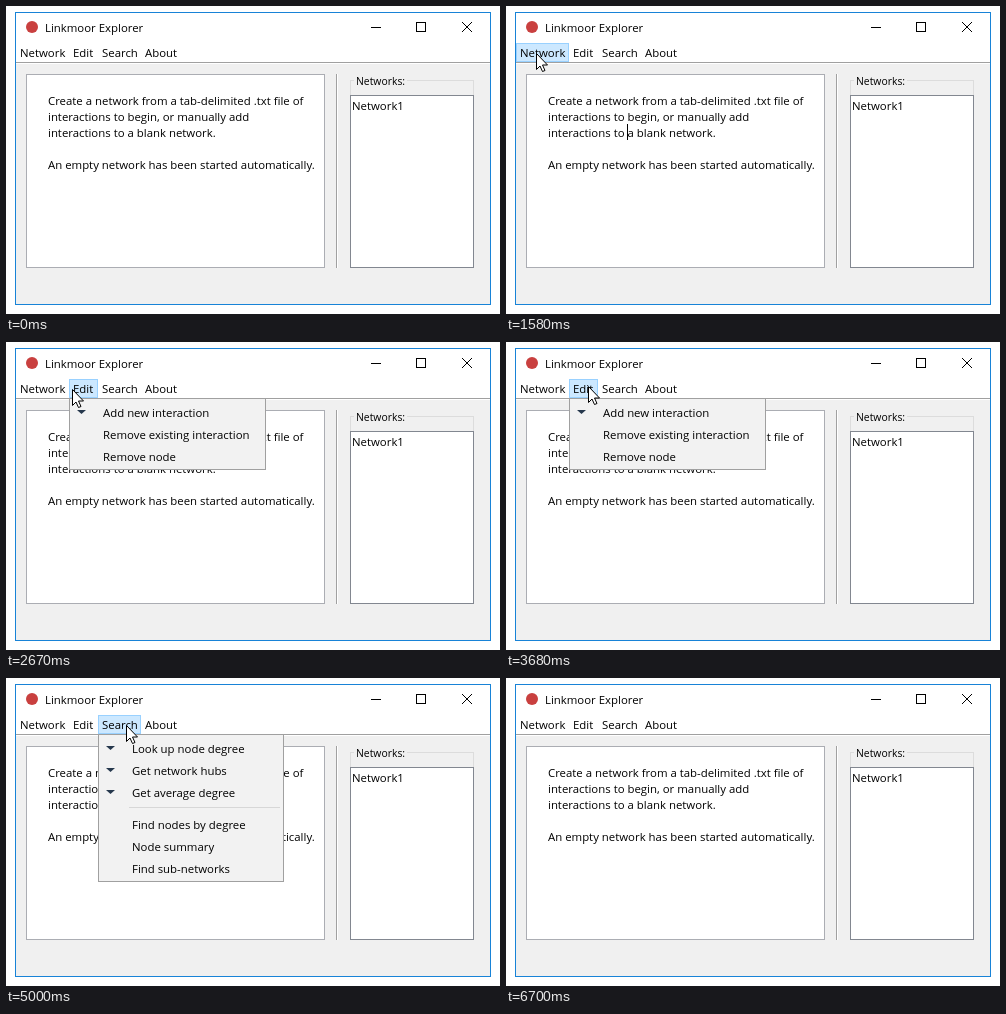
Recreate the animation shown at these times as an HTML page. Size 494 px wide and 308 px high, loop 7620 ms.

```html
<!DOCTYPE html>
<html lang="en">
<head>
<meta charset="utf-8">
<title>Menu tour</title>
<style>
  html, body { margin: 0; width: 100%; height: 100%; overflow: hidden; background: #fff; }
  svg { display: block; width: 494px; height: 308px; }
  text { font: 11.4px "Open Sans", "Noto Sans", sans-serif; fill: #000; white-space: pre; }
  rect, .line { shape-rendering: crispEdges; }
</style>
</head>
<body>
<svg id="stage" viewBox="0 0 494 308"></svg>
<script>
const LOOP = 7620, STEP = 75;
const stage = document.getElementById("stage");

function add(parent, tag, attrs, content) {
  const node = document.createElementNS("http://www.w3.org/2000/svg", tag);
  for (const key in attrs) node.setAttribute(key, attrs[key]);
  if (content) node.textContent = content;
  return parent.appendChild(node);
}
const fill = (p, x, y, width, height, color) =>
  add(p, "rect", { x, y, width, height, fill: color });
const box = (p, x, y, w, h, color, stroke) =>
  add(p, "rect", { x: x + .5, y: y + .5, width: w - 1, height: h - 1, fill: color, stroke });
const label = (p, x, y, str) => add(p, "text", { x, y }, str);
const show = (node, on) => node.setAttribute("visibility", on ? "visible" : "hidden");

// Items marked with "*" carry an arrow; "-" is a separator.
const menus = [
  { name: "Network", tab: 53, width: 199, items: [
    "*Create new network from file", "*Create new blank network", "-",
    "*Export degree distribution", "Export network as file", "Display network interactions", "-",
    "Rename current network", "Duplicate current network", "Delete current network"] },
  { name: "Edit", tab: 29, width: 197, items: [
    "*Add new interaction", "Remove existing interaction", "Remove node"] },
  { name: "Search", tab: 43, width: 186, items: [
    "*Look up node degree", "*Get network hubs", "*Get average degree", "-",
    "Find nodes by degree", "Node summary", "Find sub-networks"] },
  { name: "About", tab: 41, width: 75, items: ["Help"] }
];

function drawWindow() {
  box(stage, 9, 6, 476, 293, "#f0f0f0", "#1883d7");
  fill(stage, 10, 7, 474, 51, "#fff");
  fill(stage, 10, 56, 474, 1, "#a0a0a0");
  add(stage, "circle", { cx: 26, cy: 21, r: 6, fill: "#c9403f" });
  label(stage, 39, 26, "Linkmoor Explorer");

  fill(stage, 365, 21, 10, 1, "#000");
  box(stage, 410, 16, 10, 10, "none", "#000");
  add(stage, "path", { d: "M456 16l10 10m0-10l-10 10", stroke: "#000", fill: "none" });

  box(stage, 20, 68, 299, 194, "#fff", "#abadb3");
  ["Create a network from a tab-delimited .txt file of",
   "interactions to begin, or manually add",
   "interactions to a blank network.", "",
   "An empty network has been started automatically."
  ].forEach((str, i) => label(stage, 42, 99 + 16 * i, str));

  fill(stage, 330, 68, 1, 194, "#a0a0a0");
  fill(stage, 331, 68, 1, 194, "#fff");
  add(stage, "path", { class: "line", d: "M344.5 89V74.5H348M401 74.5H467.5V89",
    stroke: "#dcdcdc", fill: "none" });
  label(stage, 350, 79, "Networks:").style.fontSize = "10.4px";
  box(stage, 344, 89, 124, 173, "#fff", "#828790");
  label(stage, 346, 104, "Network1");
}

function drawMenu(menu, x) {
  menu.x = x;
  menu.hot = box(stage, x, 37, menu.tab, 19, "none", "none");
  label(stage, x + 4, 51, menu.name);

  const rowHeight = item => item === "-" ? 10 : 22;
  const height = menu.items.reduce((sum, item) => sum + rowHeight(item), 6);
  const popup = menu.popup = add(stage, "g", {});
  box(popup, x, 56, menu.width, height, "#f2f2f2", "#a0a0a0");
  let y = 60;
  for (const item of menu.items) {
    if (item === "-") fill(popup, x + 31, y + 3, menu.width - 35, 1, "#d7d7d7");
    else label(popup, x + 34, y + 15, item.replace("*", ""));
    if (item[0] === "*")
      add(popup, "path", { d: `M${x + 8} ${y + 8}h9l-4.5 4z`, fill: "#26384d" });
    y += rowHeight(item);
  }
  return x + menu.tab;
}

drawWindow();
const caret = fill(stage, 121, 118, 1, 16, "#000");
menus.reduce((x, menu) => drawMenu(menu, x), 10);
menus.forEach(menu => stage.append(menu.popup));
const pointer = add(stage, "path", {
  d: "M.5 .5V16.5L4 13L6.5 18.5L9 17.5L6.5 12H11.5Z", fill: "#fff", stroke: "#000"
});

// Each glide runs in a few hard steps, then rests until the next one.
const glides = [
  { at: 970, steps: 4, from: [2, 35], to: [30, 47] },
  { at: 2440, steps: 6, from: [42, 47], to: [74, 47] },
  { at: 3680, steps: 6, from: [82, 44], to: [114, 44] },
  { at: 5000, steps: 4, from: [120, 47], to: [152, 48] },
  { at: 6390, steps: 3, from: [164, 50], to: [214, 61] }
];
const PRESS = 1580, OPEN = 1660, CLOSE = 6630, LEAVE = 6700;

function pointerAt(t) {
  const glide = glides.findLast(g => g.at <= t);
  if (!glide || t >= LEAVE) return null;
  const { at, steps, from, to } = glide;
  const u = Math.min(Math.floor((t - at) / STEP) / steps, 1);
  const eased = u * (2 - u);
  return from.map((v, i) => Math.round(v + (to[i] - v) * eased));
}

function draw(t) {
  const tip = pointerAt(t);
  show(pointer, tip);
  if (tip) pointer.setAttribute("transform", `translate(${tip})`);
  show(caret, (t >= 270 && t < 800) || (t >= 1270 && t < OPEN));

  const over = tip && t < CLOSE ? menus.findLast(m => m.x <= tip[0]) : null;
  const [face, edge] = t < PRESS ? ["#e5f3ff", "#cce8ff"] : ["#cce8ff", "#99d1ff"];
  for (const menu of menus) {
    const on = menu === over;
    menu.hot.setAttribute("fill", on ? face : "none");
    menu.hot.setAttribute("stroke", on ? edge : "none");
    show(menu.popup, on && t >= OPEN);
  }
}

const start = performance.now();
function tick() {
  draw((performance.now() - start) % LOOP);
  requestAnimationFrame(tick);
}
tick();
</script>
</body>
</html>
```
